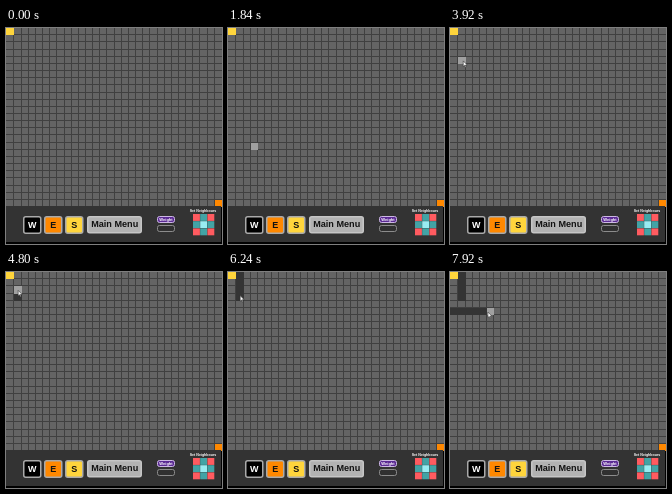
An HTML page with a canvas that plays this animation: 216 px wide and 216 px high, repeating every 8000 ms.

```html
<!DOCTYPE html>
<html>
<head>
<meta charset="utf-8">
<style>
html, body { margin: 0; width: 100%; height: 100%; overflow: hidden; background: #000; }
canvas { display: block; }
</style>
</head>
<body>
<canvas id="stage" width="216" height="216"></canvas>
<script>
const c = document.getElementById('stage').getContext('2d');
const COLS = 30, ROWS = 25, PITCH = 7.155, LOOP = 8000, STEP = 80;
const YELLOW = '#ffd53c', ORANGE = '#ff8800';

// Pixel of the grid line before a column or row
const lineX = col => col ? Math.floor(col * PITCH + .8) : -1;
const lineY = row => Math.floor(row * PITCH - .36);

// Pointer moves in cell units; it rests between them
const moves = [
  { from: 1520, to: 2080, x: 3.5, y: 8.5 },
  { from: 2240, to: 2720, x: 1.6, y: 1.5 },
  { from: 2720, to: 2880, x: 1.5, y: .4 },
  { from: 3360, to: 3920, x: 1.85, y: 4.6 },
  { from: 4160, to: 4320, x: 1.7, y: 3.5 },
  { from: 4560, to: 5360, x: 1.7, y: .4 },
  { from: 5920, to: 6240, x: 1.7, y: 3.3 },
  { from: 6400, to: 6960, x: .56, y: 6 },
  { from: 7200, to: 7360, x: .5, y: 5.6 },
  { from: 7360, to: 7920, x: 5.3, y: 5.6 }
];

function pointer(t) {
  let x = 3.5, y = 26.5;
  for (const m of moves) {
    const k = Math.min(1, Math.max(0, (t - m.from) / (m.to - m.from)));
    x += (m.x - x) * k;
    y += (m.y - y) * k;
  }
  return [x, y];
}

function rect(x, y, w, h, color) {
  c.fillStyle = color;
  c.fillRect(x, y, w, h);
}

function cells(col, row, w, h, color) {
  const x = lineX(col), y = lineY(row);
  rect(x + 1, y + 1, lineX(col + w) - x, lineY(row + h) - y, color);
}

function box(x, y, w, h, fill, stroke, line) {
  c.beginPath();
  c.roundRect(x + line / 2, y + line / 2, w - line, h - line, 2);
  c.fillStyle = fill;
  c.fill();
  c.lineWidth = line;
  c.strokeStyle = stroke;
  c.stroke();
}

function label(text, x, y, size, color) {
  c.font = `bold ${size}px "Liberation Sans", Arial, sans-serif`;
  c.textAlign = 'center';
  c.fillStyle = color;
  c.fillText(text, x, y);
}

function grid() {
  rect(0, 0, 216, 179, '#646464');
  for (let i = 1; i < COLS; i++) rect(lineX(i), 0, 1, 179, '#404040');
  for (let i = 1; i < ROWS; i++) rect(0, lineY(i), 216, 1, '#404040');
}

function panel() {
  rect(0, 178, 215, 36, '#333');
  ['#000', ORANGE, YELLOW].forEach((fill, i) => {
    const x = 17 + i * 21;
    box(x, 188, 18.5, 18, fill, '#aaa', 1.5);
    label('WES'[i], x + 9.2, 200.3, 9, i ? '#111' : '#fff');
  });
  box(81, 188, 55, 17.5, '#b2b2b2', '#c6c6c6', 1.5);
  label('Main Menu', 108.7, 199.3, 9.1, '#111');
  box(151, 188, 18, 7, '#5b2a94', '#cdb8e4', 1);
  label('Weight', 160, 193, 4, '#fff');
  box(151, 197, 18, 7, '#303030', '#8c8c8c', 1);
  label('Set Neighbours', 197, 184, 3.6, '#fff');
  for (let i = 0; i < 9; i++) {
    const color = i === 4 ? '#98ecf2' : i % 2 ? '#42a3a5' : '#ff5b60';
    rect(187 + i % 3 * 7.2, 186 + Math.floor(i / 3) * 7.2, 6.9, 6.9, color);
  }
}

function arrow(x, y) {
  c.save();
  c.translate(x, y);
  const shape = new Path2D('M0 0V5.6L1.3 4.4 2.2 6.4 3 6 2.2 4.1H4Z');
  c.lineWidth = .6;
  c.strokeStyle = '#333';
  c.fillStyle = '#fff';
  c.fill(shape);
  c.stroke(shape);
  c.restore();
}

function draw(t) {
  rect(0, 0, 216, 216, '#000');
  grid();
  const [x, y] = pointer(t), col = Math.floor(x), row = Math.floor(y);
  const resting = t >= 6880 && t < 7360;
  if (row < ROWS && !resting) cells(col, row, 1, 1, '#a0a0a0');

  const wall = (...area) => cells(...area, '#343434');
  if (t >= 4560) wall(1, 3, 1, 1);
  if (t >= 5920) wall(1, 0, 1, t < 6240 ? row + 1 : 4);
  if (t >= 7360) wall(0, 5, col || 1, 1);

  cells(0, 0, 1, 1, YELLOW);
  cells(COLS - 1, ROWS - 1, 1, 1, ORANGE);
  panel();
  if (t >= 3360) arrow(x * PITCH, y * PITCH);
}

function tick(now) {
  draw(Math.floor(now % LOOP / STEP) * STEP);
  requestAnimationFrame(tick);
}
requestAnimationFrame(tick);
</script>
</body>
</html>
```
